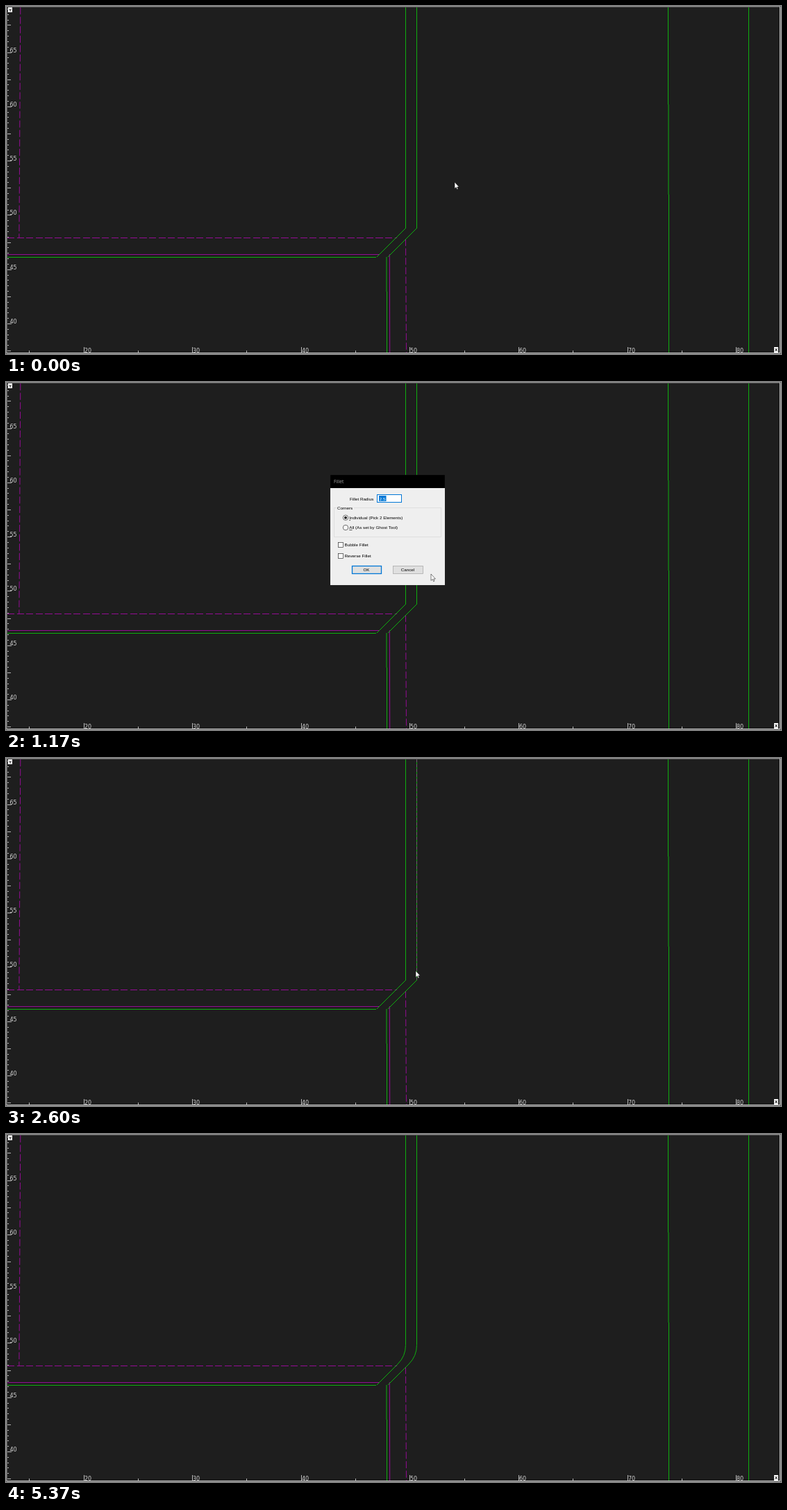
An HTML page that plays this animation: 1116 by 502 pixels, repeating every 6330 ms.

```html
<!DOCTYPE html>
<html lang="en">
<head>
<meta charset="utf-8">
<title>Fillet tool</title>
<style>
  html, body { margin: 0; width: 100%; height: 100%; overflow: hidden; background: #1e1e1e; }
  svg { display: block; width: 1116px; height: 502px; }
  .line { fill: none; stroke-width: 1; shape-rendering: crispEdges; }
  .soft { shape-rendering: auto; }
  .green { stroke: #0fae0f; }
  .purple { stroke: #940c94; }
  .dash { stroke-dasharray: 10.2 3.4; }
  .hover { stroke: #705c6c; stroke-dasharray: 4 3; }
  .axis { font: 8px "DejaVu Sans", sans-serif; fill: #d0d0d0; }
  .tick { stroke: #b8b8b8; }
  .badge { font: bold 6px "Liberation Sans", sans-serif; text-anchor: middle; }
  .crisp { shape-rendering: crispEdges; }
  #dialog text { font: 6.25px "Liberation Sans", Arial, sans-serif; fill: #000; }
  #dialog .title { font: 6.5px "Open Sans", sans-serif; fill: #fff; }
  #dialog .mid { text-anchor: middle; }
  #dialog .picked { fill: #fff; }
  #dialog.idle .title { fill: #aaa; }
  #dialog.idle #close { display: none; }
</style>
</head>
<body>
<svg viewBox="0 0 1116 502">
  <rect width="1116" height="502" fill="#1e1e1e"/>
  <g id="ruler"></g>
  <g id="drawing"></g>
  <g class="crisp">
    <path d="M0 0H1116V1H1V502H0Z" fill="#8e8e8e"/>
    <path d="M1 1H1115V2H2V500H1Z" fill="#585858"/>
    <path d="M1114 1H1115V501H1V500H1114Z" fill="#d0d0d0"/>
    <path d="M1115 0H1116V502H0V501H1115Z" fill="#606060"/>
    <rect x="3" y="2" width="6" height="7" fill="#fff"/>
    <rect x="1106" y="492" width="6" height="8" fill="#fff"/>
  </g>
  <text class="badge" x="6" y="8">Y</text>
  <text class="badge" x="1109" y="498">X</text>

  <g id="dialog">
    <rect x="467" y="134" width="165" height="159" fill="#f0f0f0"/>
    <rect x="467" y="134" width="165" height="19" fill="#000"/>
    <text class="title" x="472" y="146">Fillet</text>
    <path id="close" d="M619 140.5l6 6m0-6l-6 6" stroke="#fff" stroke-width=".8"/>

    <text x="495" y="171">Fillet Radius</text>
    <rect x="534.5" y="162.5" width="35" height="11" fill="#fff" stroke="#0078d7"/>
    <rect x="537" y="164" width="10.5" height="8" fill="#0078d7"/>
    <text class="picked" x="537.7" y="170.7">2.5</text>
    <rect id="caret" x="547" y="164" width="1" height="8" fill="#000"/>

    <rect x="472.5" y="181.5" width="154" height="42" fill="none" stroke="#dcdcdc" stroke-width=".8"/>
    <rect x="476" y="178" width="25" height="7" fill="#f0f0f0"/>
    <text x="477" y="183.5">Corners</text>

    <g fill="#fff" stroke="#333" stroke-width=".7">
      <circle cx="489" cy="195.7" r="3.7"/>
      <circle cx="489" cy="210" r="3.7"/>
      <rect x="478.5" y="231.5" width="7" height="7"/>
      <rect x="478.5" y="247.5" width="7" height="7"/>
    </g>
    <circle cx="489" cy="195.7" r="2" fill="#222"/>
    <text x="494.3" y="198.3"><tspan text-decoration="underline">I</tspan>ndividual (Pick 2 Elements)</text>
    <text x="494.3" y="212.4"><tspan text-decoration="underline">A</tspan>ll (As set by Ghost Tool)</text>
    <text x="487.5" y="237.5">Bubble Fillet</text>
    <text x="487.5" y="253.5">Reverse Fillet</text>

    <rect x="498.5" y="265.5" width="42" height="11" fill="#e1e1e1" stroke="#0078d7" stroke-width="1.3"/>
    <rect x="557.5" y="265.5" width="43" height="11" fill="#e1e1e1" stroke="#adadad" stroke-width=".8"/>
    <text class="mid" x="519" y="273.3">OK</text>
    <text class="mid" x="578.5" y="273.3">Cancel</text>
  </g>

  <path id="cursor" d="M0 0V9.4L2.2 7.4L3.6 10.7L5 10.1L3.7 7H6.4Z" fill="#fff" stroke="#000" stroke-width=".5"/>
</svg>
<script>
const LOOP = 6330;
const $ = id => document.getElementById(id);

function add(parent, tag, attrs, text) {
  const el = document.createElementNS("http://www.w3.org/2000/svg", tag);
  for (const key in attrs) el.setAttribute(key, attrs[key]);
  if (text !== undefined) el.textContent = text;
  return parent.appendChild(el);
}

// Rulers: 15.66 px per unit
const UNIT = 15.66;
const ruler = $("ruler");
const tick = d => add(ruler, "path", { d, class: "line tick" });
const label = (x, y, value) => add(ruler, "text", { x, y, class: "axis" }, value);

for (let i = 0; i < 64; i++) {
  const value = 69 - i / 2;
  const y = Math.floor(67 + (65 - value) * UNIT) + 0.5;
  if (y < 3 || y > 499) continue;
  tick(`M2 ${y}h${value % 5 === 0 ? 6 : value % 2.5 === 0 ? 5 : 2}`);
  if (value % 5 === 0) label(5.5, y - 0.5, value);
}
for (let value = 15; value <= 80; value += 5) {
  const x = Math.floor(112 + (value - 20) * UNIT) + 0.5;
  const major = value % 10 === 0;
  tick(`M${x} 500v${major ? -8 : -3}`);
  if (major) label(x + 0.5, 500, value);
}

// Fixed geometry
const drawing = $("drawing");
const line = (cls, d) => add(drawing, "path", { d, class: "line " + cls });

line("purple dash soft", "M20.8 2L18.9 334");
line("purple dash", "M2 334.5H563");
line("purple", "M2 358.5H537");
line("purple soft", "M552.3 358L552.7 500");
line("purple dash soft", "M575.5 336L576.5 500");
line("green soft", "M548 362V412M548.5 412V500");
line("green soft", "M953.5 2V142M954 142V272M954.5 272V500");
line("green", "M1069.5 2V500");

// Elements that can be hovered; the upright, slope and bend change once filleted
const INNER_CUT = 4130, OUTER_CUT = 2830;
const TOP = 320.5, REACH = 16.2, RADIUS = 39;
const DROP = REACH * Math.SQRT1_2;
const upright = (x, cut) => t => `M${x} 2V${t < cut ? TOP : TOP - REACH}`;
const slope = (x, cut) => t => {
  const d = t < cut ? 0 : DROP;
  return `M${x - d} ${TOP + d}L${x - 42} ${TOP + 42}`;
};
const bend = (x, cut) => t => t < cut ? "" :
  `M${x} ${TOP - REACH}A${RADIUS} ${RADIUS} 0 0 1 ${x - DROP} ${TOP + DROP}`;

const parts = [
  { shape: () => "M2 362.5H533", hovers: [[4590, 4690]] },
  { shape: upright(575.5, INNER_CUT), hovers: [[1370, 1500], [3030, 3770]] },
  { shape: slope(575.5, INNER_CUT), hovers: [[1500, 1600], [3770, 4130], [4400, 4470]] },
  { shape: bend(575.5, INNER_CUT), hovers: [[4330, 4400]], soft: true },
  { shape: upright(591.5, OUTER_CUT), hovers: [[2570, 2830]] },
  { shape: slope(591.5, OUTER_CUT), hovers: [[1800, 2500]] },
  { shape: bend(591.5, OUTER_CUT), hovers: [], soft: true }
];
for (const part of parts) {
  const edge = part.soft ? " soft" : "";
  part.base = line("green" + edge, "");
  part.glow = line("hover" + edge, "");
}

// Pointer stops: time, x, y
const stops = [
  [0, 646, 254], [1050, 646, 254], [1270, 584, 295], [1420, 580, 314], [1630, 578, 323],
  [1700, 578, 323], [2000, 585, 321], [2140, 585, 321], [2300, 586, 320],
  [2440, 586, 320], [2600, 590, 307], [2830, 590, 307], [3100, 575, 311],
  [3440, 575, 311], [3530, 573, 314], [3740, 573, 314], [3770, 573, 318],
  [3830, 573, 319], [4300, 573, 319], [4930, 179, 425], [4940, 179, 425],
  [5370, 42, 504], [LOOP, 42, 504]
];

function pointerAt(t) {
  const i = stops.findIndex(s => s[0] > t);
  const a = stops[i - 1], b = stops[i];
  const p = (t - a[0]) / (b[0] - a[0]);
  return [1, 2].map(k => Math.round(a[k] + (b[k] - a[k]) * p));
}

const span = (t, from, to) => Math.min(1, Math.max(0, (t - from) / (to - from)));

function drawDialog(t) {
  const shown = 1 - (1 - span(t, 310, 600)) ** 2;
  const gone = span(t, 1170, 1355);
  const opacity = shown * (1 - gone);
  const scale = (0.9 + 0.1 * shown) * (1 - 0.055 * gone);
  const dialog = $("dialog");
  dialog.style.display = opacity > 0 ? "" : "none";
  dialog.setAttribute("opacity", opacity);
  dialog.setAttribute("transform",
    `translate(549.5 213.5) scale(${scale}) translate(-549.5 -213.5)`);
  dialog.classList.toggle("idle", gone > 0);
  $("caret").style.display = t < 800 ? "" : "none";
}

function render(t) {
  for (const { shape, hovers, base, glow } of parts) {
    const d = shape(t);
    base.setAttribute("d", d);
    glow.setAttribute("d", hovers.some(([a, b]) => t >= a && t < b) ? d : "");
  }
  drawDialog(t);
  const [x, y] = pointerAt(t);
  $("cursor").setAttribute("transform", `translate(${x} ${y})`);
}

const start = performance.now();
function loop() {
  render((performance.now() - start) % LOOP);
  requestAnimationFrame(loop);
}
loop();
</script>
</body>
</html>
```
